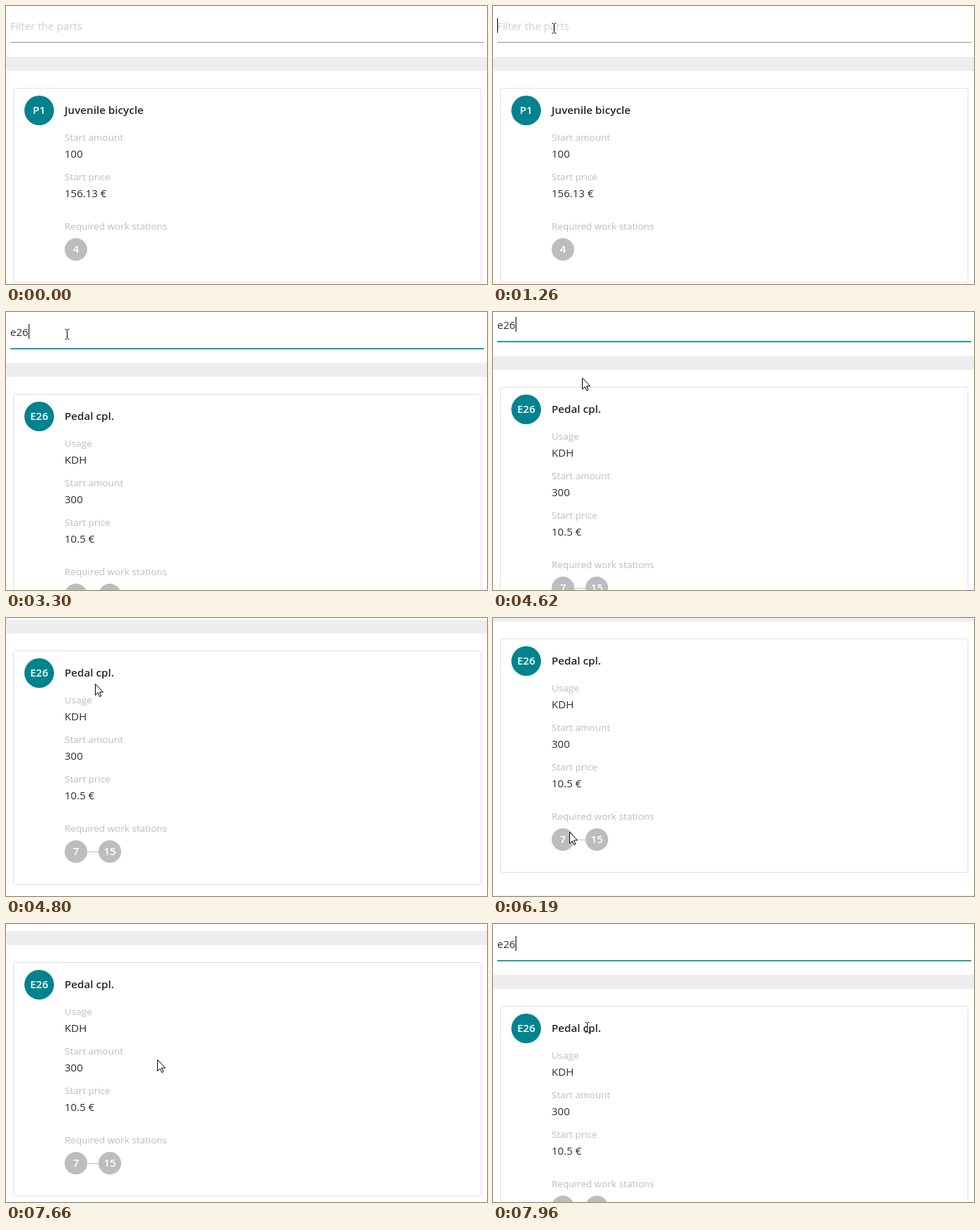
Write an HTML page that moves like this. It is 681 px wide and 394 px high and loops after 7.99 s.

```html
<!DOCTYPE html>
<html lang="en">
<head>
<meta charset="utf-8">
<title>Parts filter</title>
<style>
  html, body { margin: 0; width: 100%; height: 100%; overflow: hidden; background: #fff; }
  svg { display: block; width: 681px; height: 394px; }
  text { font: 15px "Open Sans", "Noto Sans", sans-serif; fill: #2e2e2e; white-space: pre; }
  .hint { fill: #cfcfcf; }
  .label { font-size: 13.5px; fill: #bdbdbd; }
  .title { font-size: 15.2px; font-weight: 600; fill: #262626; }
  .badge { font-weight: 600; fill: #fff; text-anchor: middle; }
  .card { fill: #fff; stroke: #e0e0e0; }
</style>
</head>
<body>
<svg viewBox="0 0 681 394">
  <g id="page">
    <text id="hint" class="hint" x="6" y="34">Filter the parts</text>
    <text id="typed" x="6" y="34"></text>
    <rect id="caret" y="17" width="1" height="21" fill="#000"/>
    <rect x="6" y="51" width="671" height="1" fill="#949494"/>
    <rect id="ripple" y="51" height="2" fill="#26a09a"/>
    <rect y="72" width="681" height="20" fill="#eee"/>
    <g id="all"></g>
    <g id="found"></g>
  </g>
  <path id="arrow" fill="#fff" stroke="#000" d="M.5 .5V16.5L4.2 13L6.7 18.5L8.9 17.5L6.5 12H11.5Z"/>
  <path id="beam" fill="none" stroke="#000" d="M-3 -6.5H-1M1 -6.5H3M-3 7.5H-1M1 7.5H3M0 -6V7"/>
</svg>
<script>
const LOOP = 7990;
const $ = id => document.getElementById(id);

function add(parent, tag, attrs, text = '') {
  const el = document.createElementNS('http://www.w3.org/2000/svg', tag);
  for (const key in attrs) el.setAttribute(key, attrs[key]);
  el.textContent = text;
  parent.append(el);
}

function disc(g, cx, cy, r, fill, text) {
  add(g, 'circle', { cx, cy, r, fill });
  add(g, 'text', { class: 'badge', x: cx, y: cy + 5 }, text);
}

function buildCard(g, id, title, rows, stations) {
  const extra = rows.length * 56;
  add(g, 'rect', { class: 'card', x: 10.5, y: 116.5, width: 662, height: 163 + extra, rx: 2 });
  disc(g, 47, 148, 21, '#00838f', id);
  add(g, 'text', { class: 'title', x: 83, y: 153 }, title);
  rows.forEach(([label, value], i) => {
    add(g, 'text', { class: 'label', x: 83, y: 191 + i * 56 }, label);
    add(g, 'text', { x: 83, y: 215 + i * 56 }, value);
  });
  add(g, 'text', { class: 'label', x: 83, y: 205 + extra }, 'Required work stations');
  const cy = 233 + extra;
  if (stations.length > 1) add(g, 'rect', { x: 115, y: cy, width: 16, height: 1, fill: '#bdbdbd' });
  stations.forEach((name, i) => disc(g, 99 + i * 48, cy, 16, '#bdbdbd', name));
}

add($('all'), 'rect', { class: 'card', x: 10.5, y: 391.5, width: 662, height: 275, rx: 2 });
buildCard($('all'), 'P1', 'Juvenile bicycle',
  [['Start amount', '100'], ['Start price', '156.13 €']], ['4']);
buildCard($('found'), 'E26', 'Pedal cpl.',
  [['Usage', 'KDH'], ['Start amount', '300'], ['Start price', '10.5 €']], ['7', '15']);
add($('found'), 'rect', { y: 480, width: 681, height: 1, fill: '#eee' });

// Pointer moves: start, end, number of steps, waypoints
const moves = [
  [140, 370, 5, [[212, 316], [229, 179]]],
  [520, 1020, 10, [[229, 179], [150, 62], [78, 24], [86, 31]]],
  [4120, 4370, 5, [[86, 31], [126, 93]]],
  [5500, 5730, 6, [[126, 93], [128, 244]]],
  [5960, 6190, 6, [[128, 244], [108, 303]]],
  [6440, 6930, 12, [[108, 303], [100, 310], [126, 334], [167, 340]]],
  [7180, 7330, 4, [[167, 340], [214, 192]]],
  [7810, 7960, 4, [[214, 192], [133, 146]]]
];

// Scrolls: start, end, offset at each step
const scrolls = [
  [4620, 4850, [10, 30, 52, 70, 82, 87]],
  [7610, 7860, [81, 62, 40, 20, 6, 0]]
];

// Typing: time, text, caret position
const typing = [[0, '', 6], [2620, 'e', 14], [3130, 'e2', 23], [3300, 'e26', 32]];

const latest = (list, t) => list.filter(item => item[0] <= t).pop();
const show = (id, on) => $(id).setAttribute('visibility', on ? 'visible' : 'hidden');
const stepAt = (t, start, end, n) =>
  Math.min(n - 1, Math.floor((t - start) / (end - start) * (n - 1) + 1e-6));

function along(points, p) {
  const pos = p * (points.length - 1);
  const i = Math.min(points.length - 2, Math.floor(pos));
  return points[i].map((v, axis) => Math.round(v + (points[i + 1][axis] - v) * (pos - i)));
}

function scrollAt(t) {
  const move = latest(scrolls, t);
  return move ? move[2][stepAt(t, move[0], move[1], move[2].length)] : 0;
}

function drawPointer(t) {
  const move = latest(moves, t);
  if (!move) {
    show('arrow', false);
    show('beam', false);
    return;
  }
  const [start, end, n, points] = move;
  const [x, y] = along(points, (stepAt(t, start, end, n) + 1) / n);
  const overText = y < 51 || t >= 7910;
  show('arrow', !overText);
  show('beam', overText);
  $('arrow').setAttribute('transform', `translate(${x} ${y})`);
  $('beam').setAttribute('transform', `translate(${x + .5} ${y})`);
}

function draw(t) {
  $('page').setAttribute('transform', `translate(0 ${-scrollAt(t)})`);

  const [, text, caretX] = latest(typing, t);
  $('typed').textContent = text;
  $('caret').setAttribute('x', caretX);
  show('hint', !text);
  show('caret', t >= 1260 && !(t >= 2070 && t < 2620) && !(t >= 3870 && t < 4370));

  const p = Math.max(0, Math.min(1, (t - 1260) / 180));
  const grow = 1 - (1 - p) ** 2;
  const width = 671 * (.5 + grow / 2);
  $('ripple').setAttribute('x', 341.5 - width / 2);
  $('ripple').setAttribute('width', width);
  $('ripple').setAttribute('opacity', grow);

  show('all', t < 3300);
  show('found', t >= 3300);
  drawPointer(t);
}

const began = performance.now();
function tick() {
  draw((performance.now() - began) % LOOP);
  requestAnimationFrame(tick);
}
tick();
</script>
</body>
</html>
```
